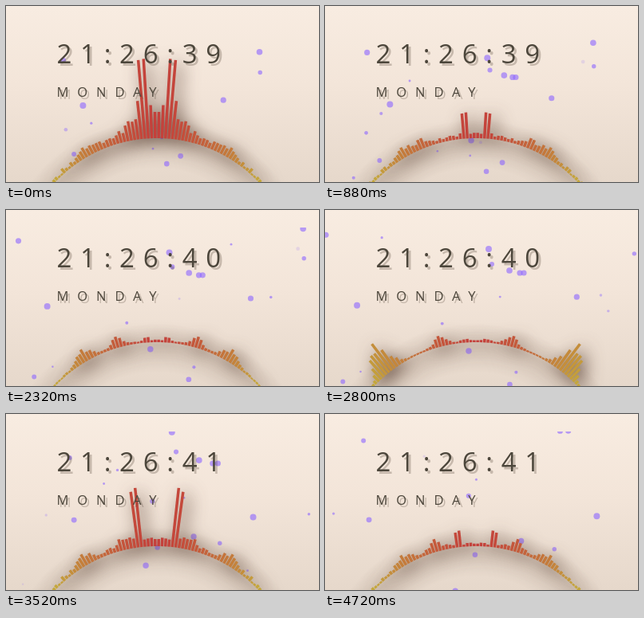
These frames come from a looping animation (392 by 221 pixels, 4800 ms). An HTML page with a canvas:

```html
<!DOCTYPE html>
<html lang="en">
<head>
<meta charset="utf-8">
<title>Clock visualizer</title>
<style>
html, body { margin: 0; width: 100%; height: 100%; overflow: hidden; }
body { position: relative; background: linear-gradient(#f8ece1, #f3e5d9 45%, #e6d8cb); }
canvas { position: absolute; left: 0; top: 0; width: 392px; height: 221px; }
.text {
  position: absolute; left: 63.5px; line-height: 1; white-space: pre;
  font-family: "Open Sans", "Noto Sans", sans-serif;
  color: #4c463b; text-shadow: 3px 3px 0 rgba(80, 66, 52, .28);
}
#clock { top: 43px; font-size: 33px; letter-spacing: 10.7px; }
#day { top: 100px; font-size: 16.5px; letter-spacing: 10.9px; }
</style>
</head>
<body>
<canvas id="stage" width="392" height="221"></canvas>
<div id="clock" class="text">21:26:39</div>
<div id="day" class="text">MONDAY</div>
<script>
const W = 392, H = 221, LOOP = 4800, STEP = 80;
const stage = document.getElementById('stage');
const clock = document.getElementById('clock');
const ctx = stage.getContext('2d');
const layer = document.createElement('canvas');
layer.width = W;
layer.height = H;
const bars = layer.getContext('2d');

const ring = { x: 189, y: 340, r: 174, step: 0.0245, count: 42 };
const origin = { x: 196, y: 134 };
const dots = [];

const rand = n => {
  const v = Math.sin(n * 127.1 + 11.7) * 43758.5453;
  return v - Math.floor(v);
};
const bell = (x, center, width) => Math.exp(-Math.pow((x - center) / width, 2));

// The drift gets faster once the beat returns.
const warp = t => t + 2.4 * Math.max(0, t - 2.8);
const even = t => t;

// Dots fly away from the origin; each point is where one is at time `at`.
function drift({ at, start, end, rate, pace = even, size = 2.6 }, points) {
  for (const [x, y] of points) {
    const r = size + 1.4 * rand(dots.length);
    dots.push({ at, start, end, rate, pace, r, x: x - origin.x, y: y - origin.y });
  }
}

drift({ at: 1.76, start: 0, end: 2.8, rate: 0.16 }, [
  [297, 113], [31, 47], [226, 206], [358, 67], [64, 122], [49, 203], [203, 219], [357, 33]
]);
drift({ at: 2.8, start: 0.7, end: 4.8, rate: 0.11, pace: warp }, [
  [205, 49], [209, 68], [231, 76], [244, 79], [249, 79], [180, 177]
]);
drift({ at: 4, start: 3.1, end: 4.8, rate: 0.2 }, [
  [321, 129], [239, 156], [182, 107], [68, 47], [74, 133], [189, 171], [275, 165]
]);
for (let i = 0; i < 24; i++) {
  const at = LOOP / 1000 * i / 24;
  drift({ at, start: at - 0.5, end: at + 0.5, rate: 0.2, size: 1 },
    [[W * rand(i + 40), 22 + (H - 22) * rand(i + 90)]]);
}

// Two beats: one decays from the loop start, the other rises late.
function bassAt(t) {
  if (t < 2.9) return 97 * Math.exp(-1.35 * t);
  return 68 * Math.min((t - 2.9) / 0.62, Math.exp(-1.2 * (t - 3.52)));
}

function soundAt(t) {
  const bass = bassAt(t);
  const swell = bell(t, 2.8, 0.32) + bell(t, 4, 0.28);
  return {
    bass,
    bassPlace: t < 2.9 ? 2.5 : 4.5,
    skirt: bass * (0.08 + 0.4 * Math.pow(bass / 97, 4)),
    midPlace: 13 + 4 * Math.cos(0.9 * t),
    outerPlace: 20.5 + 6.5 * swell,
    outer: 11 + 32 * swell,
    ripple: 0.2 + 0.8 * Math.min(1, bass / 24)
  };
}

function barHeight(i, t, s) {
  const near = Math.abs(i - s.bassPlace);
  const low = near < 0.6 ? s.bass : s.skirt * (0.8 + 0.5 * rand(i)) * Math.exp(-near / 4);
  const jag = 0.6 + 0.4 * rand(i + 3);
  const mid = 12 * jag * bell(i, s.midPlace, 2);
  const outer = s.outer * jag * bell(i, s.outerPlace, 3.2);
  const wave = s.ripple * 5 * rand(i) * (0.7 + 0.3 * Math.sin(t * 9 + i * 2));
  return 1.8 + wave + Math.max(low, mid, outer);
}

function drawBars(t) {
  const sound = soundAt(t);
  bars.clearRect(0, 0, W, H);
  for (let i = 0; i < ring.count; i++) {
    const h = barHeight(i, t, sound);
    const angle = (i + 0.5) * ring.step;
    const hue = 2 + 45 * Math.pow(Math.min(1, angle / 0.8), 1.3);
    bars.fillStyle = `hsl(${hue}, 54%, 50%)`;
    for (const side of [-1, 1]) {
      bars.save();
      bars.translate(ring.x, ring.y);
      bars.rotate(side * angle);
      bars.fillRect(-1.75, -ring.r - h, 3.5, h);
      bars.restore();
    }
  }
}

function drawRingShade() {
  const inner = ring.r - 38, outer = ring.r + 24;
  const shade = ctx.createRadialGradient(ring.x, ring.y, inner, ring.x, ring.y, outer);
  shade.addColorStop(0, 'rgba(90, 66, 50, 0)');
  shade.addColorStop(0.55, 'rgba(90, 66, 50, .14)');
  shade.addColorStop(1, 'rgba(90, 66, 50, 0)');
  ctx.fillStyle = shade;
  ctx.fillRect(0, 0, W, H);
}

function drawDots(t) {
  ctx.save();
  ctx.beginPath();
  ctx.rect(0, 22, W, H - 22);
  ctx.clip();
  ctx.fillStyle = 'rgb(142, 104, 255)';
  for (const d of dots) {
    const alpha = Math.min(1, 1 + Math.min(t - d.start, d.end - t) / 0.3);
    if (alpha <= 0) continue;
    const k = Math.exp(d.rate * (d.pace(t) - d.pace(d.at)));
    ctx.globalAlpha = 0.62 * alpha;
    ctx.beginPath();
    ctx.arc(origin.x + d.x * k, origin.y + d.y * k, d.r, 0, Math.PI * 2);
    ctx.fill();
  }
  ctx.restore();
}

function render(ms) {
  const t = Math.floor(ms % LOOP / STEP) * STEP / 1000;
  ctx.clearRect(0, 0, W, H);
  drawRingShade();
  drawDots(t);
  drawBars(t);
  ctx.save();
  ctx.shadowColor = 'rgba(70, 45, 32, .85)';
  ctx.shadowBlur = 22;
  ctx.shadowOffsetX = 6;
  ctx.shadowOffsetY = 5;
  ctx.drawImage(layer, 0, 0);
  ctx.restore();
  clock.textContent = '21:26:' + (t < 1.36 ? 39 : t < 3.12 ? 40 : 41);
}

const begin = performance.now();
function tick() {
  render(performance.now() - begin);
  requestAnimationFrame(tick);
}
tick();
</script>
</body>
</html>
```
